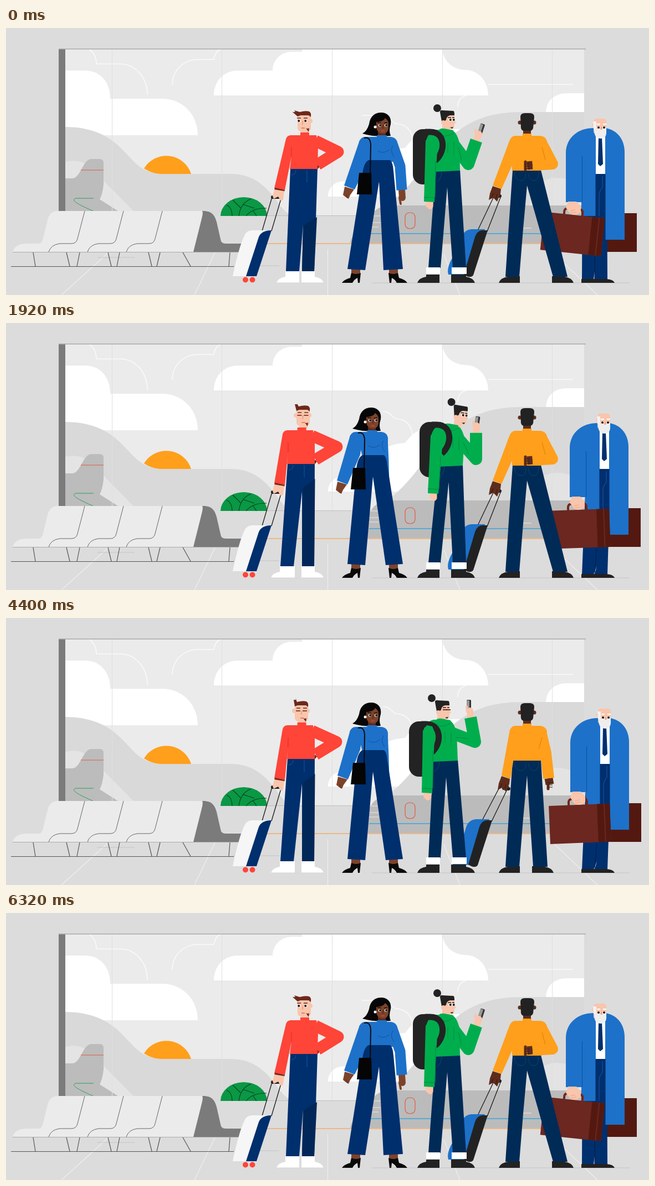
Animation of 1160x483 px, one loop 6.4 s. Source, as an HTML page with a canvas:

```html
<!DOCTYPE html>
<html lang="en">
<head>
<meta charset="utf-8">
<title>Waiting at the gate</title>
<style>
html, body { margin: 0; width: 100%; height: 100%; overflow: hidden; background: #dcdcdc; }
canvas { display: block; }
</style>
</head>
<body>
<canvas id="stage" width="1160" height="483"></canvas>
<script>
const c = document.getElementById('stage').getContext('2d');
const LOOP = 6400, STEP = 80;
const POSES = [0, 640, 1920, 3440, 4400, 5200, 6320];
const NAVY = '#002f6e', DEEP = '#002b57', BLUE = '#1d71c9', RED = '#ff4438', GREEN = '#00ad4d',
  ORANGE = '#ff9f1b', INK = '#222', SKIN = '#f9c5ac', BROWN = '#7d432a', DARK = '#5e2c1c',
  HAIR = '#6d281b', LEATHER = '#6b2720', MAROON = '#531910';
let t = 0;

// Eased value at the current time, one number per pose; the last returns to the first.
function key(...v) {
  v.push(v[0]);
  let i = 0;
  while (i < 5 && t >= POSES[i + 1]) i++;
  const u = Math.min(1, (t - POSES[i]) / (POSES[i + 1] - POSES[i]));
  return v[i] + (v[i + 1] - v[i]) * u * u * (3 - 2 * u);
}
const shut = (...times) => times.some(s => Math.abs(t - s) < 130);
const mix = (a, b, u) => a.map((n, i) => n + (b[i] - n) * u);

function fill(color, d) {
  c.fillStyle = color;
  c.fill(new Path2D(d));
}
function line(color, width, d, cap = 'butt') {
  c.strokeStyle = color;
  c.lineWidth = width;
  c.lineCap = cap;
  c.lineJoin = 'round';
  c.stroke(new Path2D(d));
}
const poly = (color, ...p) => fill(color, 'M' + p.join('L') + 'Z');
const limb = (color, width, p, cap) => line(color, width, 'M' + p.join('L'), cap);
function dot(color, x, y, r) {
  c.fillStyle = color;
  c.beginPath();
  c.arc(x, y, r, 0, 7);
  c.fill();
}
function box(color, x, y, w, h, r = 0) {
  c.fillStyle = color;
  c.beginPath();
  c.roundRect(x, y, w, h, r);
  c.fill();
}
function at(x, y, deg, draw) {
  c.save();
  c.translate(x, y);
  c.rotate(deg * Math.PI / 180);
  draw();
  c.restore();
}
function eyes(x, y, gap, closed, lid = '#3b1a12', look = 0) {
  for (const ex of [x - gap / 2, x + gap / 2]) {
    if (closed) limb(lid, 1.6, [[ex - 4, y], [ex + 4, y]]);
    else {
      dot('#fff', ex, y, 2.6);
      dot('#111', ex + look, y, 2);
    }
  }
}
function shoe(color, toe, heel, top) {
  const s = Math.sign(heel - toe);
  fill(color, `M${toe},461q${3 * s},-9 ${16 * s},-11V${top}H${heel}V461Z`);
}
function legs(color, [l, r, y], [a, b], crotch, [d, e], foot) {
  poly(color, [l, y], [a, foot], [b, foot], crotch, [d, foot], [e, foot], [r, y]);
}

function backdrop() {
  box('#dcdcdc', 0, 0, 1160, 483);
  box('#ebebeb', 107, 38, 936, 302);
  c.save();
  c.beginPath();
  c.rect(107, 38, 936, 302);
  c.clip();
  fill('#fff', 'M107,77H142C170,77 188,97 188,128H282C318,128 346,156 346,194H107Z');
  fill('#fff', 'M375,122C375,97 392,77 418,77H481C481,58 496,43 515,43H534V38H787C789,61 808,76 829,76C853,76 870,97 870,122Z');
  fill('#fff', 'M974,152C975,130 991,118 1012,118H1043V152Z');
  fill('#fff', 'M581,305C581,288 593,277 612,277H648C655,240 685,218 720,217C735,195 760,183 790,183H830L760,305Z');
  const trace = 'M150,38Q163,48 163,65H205C236,65 255,92 255,121M300,103C300,75 322,57 345,57H375Q377,42 388,38M870,102H1023' +
    'M815,143Q815,126 830,122M642,158H668M680,160C695,160 697,173 704,173C723,174 733,187 733,203';
  line('#fafafa', 1.6, trace);
  fill('#d9d9d9', 'M107,179C158,179 188,197 210,220L230,241Q252,264 282,264H405C447,264 468,286 488,312Q500,331 515,340H107Z');
  fill('#d9d9d9', 'M660,340Q705,315 745,262C795,200 830,152 930,152H1043V340Z');
  fill('#e3e3e3', 'M945,322C950,285 970,271 993,271Q1026,271 1043,296V340H945Z');
  fill(ORANGE, 'M249,254A47,47 0 0 1 334,264H278Q262,263 249,254Z');
  fill('#e4e4e4', 'M107,242Q139,235 158,258L230,331H107Z');
  fill('#bcbcbc', 'M107,272H120C134,272 139,237 154,237H169Q176,237 176,244V283Q174,301 169,310L202,331H107Z');
  line('#e25b42', 1, 'M135,257H176');
  line('#2ca05a', 1, 'M158,308H126C117,311 125,317 157,331');
  for (const x of [191, 389, 588, 787, 985]) line('#dfdfdf', 1, `M${x}.5,38V340`);
  c.restore();
  line('#bdbdbd', 1, 'M387,339.5H660');
  fill('#bbb', 'M621,389C624,368 647,363 657,342Q667,321 695,321H1043V389Z');
  line('#e8e8e8', 1, 'M655,340H681M655,352H676M650,360H672M910,362H948');
  line('#e25b42', 1.2, 'M720,343Q720,334 729,334T738,343V354Q738,363 729,363T720,354Z');
  line('#38a5d8', 1.3, 'M655,372H1000');
  line('#f0ad6e', 1.3, 'M440,390H985');
  box('#7b7b7b', 95, 38, 12, 293);
  line('#aaa', 1.5, 'M95,38H1046');

  line('#efefef', 1.2, 'M185,406L100,483M377,406L340,483M580.5,400V483M790,410L819,483M980,400L1067,483');
  line('#c4c4c4', 1, 'M660,461H1125M410,430H493M165,415H232');

  fill('#0a9845', 'M387,340A42,34 0 0 1 471,340Z');
  line('#063f20', 1.1, 'M420,340C422,325 428,315 442,309M398,320Q408,325 408,340M433,340Q445,325 470,326M423,325L409,311M427,319L448,326M446,331L452,340');

  fill('#ebebeb', 'M12,405Q16,390 38,390H60Q65,389 67,380L75,347Q79,331 94,331H362L342,405Z');
  fill('#7b7b7b', 'M338,405L353,345Q356,334 354,331C371,330 377,339 380,351L387,382Q388,390 396,390H430V405Z');
  for (const x of [0, 70, 140])
    line('#666', 1, `M${142 + x},331L${129 + x},381Q${127 + x},390 ${118 + x},390H${97 + x}Q${81 + x},392 ${77 + x},405`);
  line('#aaa', 1, 'M12,405.5H430');
  line('#555', 1.2, 'M9,431.5H411M49,406L53,431M109,406L115,431M133,406L128,431M184,406L190,431M205,406L200,431M257,406L263,431M278,406L272,431M319,406L333,431M404,406L402,431');
}

function elder() {
  const dx = key(0, 1, 7, 1, 8, 3), tilt = key(6, 5, -2, 5, -2.3, -.3);
  at(dx, 0, 0, () => box(MAROON, 1060, 335, 78, 70));
  legs(NAVY, [1040 + dx, 1084 + dx, 260], [1039, 1060], [1062 + dx / 2, 440], [1062, 1085], 455);
  line('#001f4c', 1, `M${1063 + dx},340L1062,455`);
  fill(INK, 'M1038,461V454H1075Q1095,453 1098,461Z');
  at(dx, 0, 0, () => {
    box('#fff', 1060, 190, 25, 74);
    fill(BLUE, 'M1010,315V225C1011,198 1032,181 1060,181L1064,195V340H1038V315Z');
    fill(BLUE, 'M1082,181C1104,185 1116,203 1116,225V383H1081V192Z');
    fill(NAVY, 'M1069,197H1075L1077,246L1072,250L1068,246Z');
    line('#0c4f98', 1, 'M1039.5,232V315M1063.5,264V340M1081.5,264V383');
    line('#1d57a0', 1, 'M1076,268V288Q1071,294 1070,300V340');
    box(SKIN, 1060, 164, 23, 28, 5);
    fill('#eee', 'M1061,181Q1072,185 1083,181V191Q1082,200 1073,200T1062,192Z');
    dot(SKIN, 1061, 175, 4);
    fill('#f2f2f2', 'M1059,169H1065V183H1060Z');
    line('#fff', 2, 'M1066,174H1072M1077,174H1083');
    eyes(1074, 180, 10, shut(640, 5200), '#fff');
    line('#e99d88', 2, 'M1074,179V184');
  });
  at(1023 + dx, 335, tilt, () => {
    line(HAIR, 4, 'M-16,5V-3Q-15,-8 -9,-8H11Q17,-8 17,-2V5');
    box(LEATHER, -52, 3, 110, 69);
    box(MAROON, 35, 3, 12, 69);
    box(MAROON, 49, 3, 9, 69);
  });
  at(dx, 0, 0, () => {
    fill(SKIN, 'M1014,314H1029L1037,323V333Q1028,341 1018,336L1010,325Z');
    line('#e9a58e', 1, 'M1018,331L1027,329M1019,335L1029,333');
  });
}

function backView() {
  const roll = key(0, 0, 0, 0, 1, 1);
  const dy = key(0, 3, 0, 0, 0, 0), step = key(0, 0, 0, -36, -36, -36);
  const hand = [881 + 16 * roll, 298 + 5 * roll + dy / 2];
  at(roll * 8, 0, 0, () => {
    line(INK, 1.4, `M851,366L${881 + roll * 3},303M868,368L${893 + roll * 6},304`);
    fill(BLUE, 'M798,446Q794,432 809,410Q817,397 821,382Q825,365 840,364H864L838,447Z');
    fill(INK, 'M826,446L846,378Q850,366 860,366H869L843,447Q838,454 826,446Z');
  });
  limb(INK, 6, [[hand[0] + 1, hand[1] + 5], [hand[0] + 10, hand[1] + 6]], 'round');

  shoe(INK, 889, 927, 449);
  shoe(INK, 1024 + step, 985 + step, 449);
  const knee = key(0, 1, 0, 0, 0, 0);
  poly(DEEP, [914, 257], [907 - knee * 9, 358], [901, 450], [926, 450], [933 - knee * 10, 363], [940, 285], [987 + step, 450], [1013 + step, 450], [965, 257]);
  line('#173f6b', 1, 'M917,261Q918,276 930,276Q938,276 938,263M943,263Q943,276 952,276Q961,276 961,261');

  at(0, dy, 0, () => {
    box(DARK, 933, 180, 14, 20);
    const hx = key(0, 0, 0, 0, 0, 7);
    at(hx, 0, 0, () => {
      dot(DARK, 927, 171, 3.5);
      dot(DARK, 953, 171, 3.5);
      fill(INK, 'M928,161Q928,154 936,154H945Q953,154 953,161L951,181Q950,186 944,186H935Q930,186 929,181Z');
    });
    fill(ORANGE, 'M919,195H963Q973,195 976,205L966,258H913L911,218L909,203Q912,195 919,195Z');
    box(ORANGE, 932, 191, 16, 8);
  });
  poly(ORANGE, [909, 202 + dy], [hand[0] - 3, 285], [hand[0] + 13, 291], [919, 235 + dy], [930, 205 + dy]);
  poly(DARK, [hand[0] - 3, 286], [hand[0] + 12, 291], [hand[0] + 11, 300], [hand[0] + 5, 314], [hand[0] - 2, 307], [hand[0] - 10, 311], [hand[0] - 8, 299]);
  line('#2e1510', 1, `M${hand[0] - 5},307l3,-8M${hand[0] + 3},309l2,-8`);

  const elbow = [key(986, 989, 986, 986, 974, 983), key(246, 247, 246, 246, 245, 248)];
  const wrist = [key(950, 957, 950, 950, 979, 979), key(248, 258, 248, 248, 290, 290)];
  const palm = [key(940, 946, 940, 940, 981, 979), key(249, 264, 249, 249, 301, 301)];
  limb(DARK, 15, [wrist, palm]);
  limb(DARK, 5, [[palm[0] - 3, palm[1] - 7], [palm[0] - 3, palm[1] + 8]], 'round');
  line('#351910', 1, `M${palm[0] - 4},${palm[1] - 3}h9m-9,4h9m-9,4h9`);
  limb(ORANGE, 20, [[965, 206 + dy], elbow, wrist]);
  line('#d97e0c', 1, `M967,${216 + dy}L${elbow[0] - 13},${elbow[1] - 8}`);
}

function hiker() {
  const top = key(0, 3, 9, -4, -5, -5), hip = key(0, 2, 5, -3, -4, -3);
  const px = key(0, 3, 12, -4, -7, -6), py = key(0, -2, -4, 2, 4, 2);
  at(px, py, 0, () => box('#232323', 734, 183, 52, 100, 18));
  shoe(INK, 742, 782, 446);
  shoe(INK, 846, 803, 446);
  legs(DEEP, [775 + hip, 819 + hip, 256], [762, 784], [796 + hip / 2, 288], [806, 830], 434);
  box('#fff', 758, 433, 25, 12);
  box('#fff', 804, 433, 27, 12);
  line('#174572', 1, `M${786 + hip},260Q${785 + hip},274 ${777 + hip},278`);

  const elbow = [key(834, 836, 848, 844, 846, 844), key(246, 249, 246, 228, 224, 229)];
  const hand = [key(852, 855, 848, 841, 836, 841), key(193, 194, 187, 173, 169, 173)];
  at(key(857, 862, 850, 843, 835, 841), key(184, 187, 180, 163, 159, 163), key(18, 20, 8, 18, 0, 8), () => {
    box('#333', -4, -11, 8, 23, 1.5);
    box('#999', -4, -10, 5, 21, 1);
  });
  limb(SKIN, 12, [mix(hand, elbow, .2), [hand[0] + 1, hand[1] - 1]], 'round');
  limb(SKIN, 4, [[hand[0] - 4, hand[1]], [hand[0] - 5, hand[1] - 9]], 'round');

  limb(GREEN, 22, [[804 + top, 206], elbow, mix(hand, elbow, .2)]);
  fill(GREEN, `M${757 + top},215Q${757 + top},189 ${776 + top},184H${802 + top}Q${813 + top},186 ${818 + top},208L${819 + hip},258L${775 + hip},260Z`);
  line('#038a3f', 1, `M${797 + top},206v20M${808 + top},206v24M${816 + top},216L${elbow[0] - 12},${elbow[1] - 6}`);

  at(key(0, 8, 21, -9, -9, -7), 0, 0, () => at(796, 182, key(0, 2, 7, -1, 0, 0), () => {
    dot(INK, key(-18, -18, -18, -17, -19, -19), -37, 7);
    box(SKIN, -6, -26, 19, 27, 5);
    box(SKIN, -9, -8, 14, 14);
    poly(SKIN, [12, -18], [16, -10], [12, -9]);
    fill(INK, 'M-13,-30Q-13,-34 -8,-33L11,-32Q13,-32 13,-24L5,-24Q-1,-23 -2,-16L-5,-13H-10Z');
    dot(SKIN, -7, -11, 4);
    line(INK, 1.5, 'M1,-20H7M9,-20H13');
    eyes(8, -16, 6, shut(640, 4400), '#3b1a12', .7);
    poly(INK, [5, -2], [11, -3], [9, 0]);
  }));
  at(top, 0, 0, () => {
    fill(GREEN, 'M780,186Q782,181 791,182L807,185Q808,193 799,197Q785,200 779,192Z');
    line('#038a3f', 1, 'M779,191Q791,201 807,190');
  });

  at(px, py, 0, () => line('#232323', 11, 'M756,188H765C793,188 794,224 774,240'));
  const wx = key(764, 764, 771, 762, 760, 761), wy = key(314, 312, 308, 314, 316, 315);
  limb(SKIN, 13, [[wx, wy - 4], [wx, wy + 10]]);
  dot(SKIN, wx + 1, wy + 9, 5);
  poly(GREEN, [757 + top, 204], [wx - 10, wy], [wx + 9, wy + 1], [777 + top, 238], [779 + top, 208], [774 + top, 196], [764 + top, 194]);
  line('#038a3f', 1, `M${wx - 10},${wy - 8}l19,1M${775 + top},240L${wx + 10},${wy - 8}`);
}

function lady() {
  const top = key(0, -4, -17, 4, -17, -18), hip = key(0, -3, -11, 5, -11, -13), head = key(0, -10, -18, 1, -18, -20);
  const hx = key(617, 611, 604, 623, 605, 604);
  const elbow = [key(711, 702, 681, 734, 681, 680), key(250, 250, 250, 222, 250, 250)];
  const wrist = [key(714, 706, 682, 710, 682, 681), key(293, 291, 292, 252, 292, 292)];
  const palm = [key(715, 706, 679, 705, 679, 678), key(307, 304, 292, 262, 292, 292)];
  limb(BROWN, 12, [wrist, palm], 'round');
  limb(BROWN, 4, [[palm[0] - 5, palm[1]], [palm[0] - 3, palm[1] + 11]], 'round');
  limb(BLUE, 19, [[696 + top, 207], elbow, wrist]);

  for (const [x, s] of [[606, 1], [724, -1]]) at(x, 0, 0, () => {
    c.scale(s, 1);
    box(BROWN, 17, 434, 16, 12);
    fill('#0a0a0a', 'M0,461Q4,455 15,452L17,443Q25,447 34,443L32,461H29L28,452Q22,455 19,461Z');
  });
  poly(BLUE, [638 + top, 203], [hx - 7, 285], [hx + 12, 292], [656 + top, 238], [660 + top, 208]);
  fill(BLUE, `M${648 + top},197H${694 + top}Q${707 + top},198 ${706 + top},213L${699 + hip},242H${654 + hip}L${656 + top},225L${637 + top},206Q${640 + top},197 ${648 + top},197Z`);
  line('#1253a0', 1, `M${671 + top},222Q${680 + top},229 ${692 + top},220M${698 + top},213Q${692 + top},222 ${700 + top},233`);
  fill(BROWN, `M${hx - 6},287L${hx + 11},292L${hx + 4},302L${hx + 1},309L${hx - 4},306L${hx - 9},302Z`);
  line('#532817', 1, `M${hx - 3},301l2,7`);

  const right = key(681, 681, 685, 681, 685, 685);
  fill(NAVY, `M${654 + hip},239H${693 + hip}Q${698 + hip},243 ${699 + hip},258L716,436L${right},438L${673 + hip},278L648,438L616,436L${643 + hip},265Q${645 + hip},244 ${654 + hip},239Z`);
  at(key(0, -4, -11, 7, -11, -13), 0, 0, () => {
    line('#0a0a0a', 2, 'M646,199Q657,196 658,211L657,264');
    poly('#050505', [637, 262], [659, 262], [660, 301], [633, 301]);
  });

  at(head, 0, 0, () => {
    fill('#070707', 'M643,191Q651,187 655,174C657,158 667,152 679,153C690,154 696,163 694,174Q690,186 694,195Q666,198 643,191Z');
    box(DARK, 671, 184, 14, 15);
    fill(BROWN, 'M668,170Q680,170 684,163Q690,167 690,173V182Q688,191 680,191Q669,190 668,180Z');
    line('#21100a', 1.5, 'M670,171L677,172M682,172L688,171');
    eyes(680, 176, 11, shut(640, 3440), '#21100a', .5);
    line(DARK, 2, 'M680,176V182');
    line('#b2473e', 2, 'M677,186H683');
    dot('#fff', 666, 179, 2.5);
  });
  fill(BLUE, `M${669 + top / 2 + head / 2},194h18v8h-18Z`);
}

function fellow() {
  const dx = key(0, 0, -6, -8, -6, 0), hip = key(0, 0, -5, -6, -5, 0), foot = key(0, -7, -10, -10, -10, -10);
  line(INK, 1.4, 'M462,367L480,306M479,367L497,306');
  fill('#f6f6f6', 'M409,449C415,420 424,386 431,374Q435,366 444,366H478L450,449Z');
  fill(NAVY, 'M433,449L456,378Q461,366 479,366L452,449Z');
  dot(RED, 432, 455.5, 5);
  dot(RED, 444.5, 455.5, 5);

  shoe('#fff', 488 + foot, 529 + foot * .8, 440);
  shoe('#fff', 573, 533, 440);
  line('#d6d6d6', 1, `M${488 + foot},461H530M533,461H573`);
  legs(NAVY, [513 + hip, 562 + hip, 254], [505 + foot, 529 + foot], [536 + foot * .2, key(356, 315, 305, 300, 300, 310)], [534, 556], 440);
  const shade = key(350, 315, 290, 290, 290, 320);
  poly('#002758', [536, shade + 8], [534, 440], [556, 440], [561 + hip * .7, shade - 8]);
  line('#1c539a', 1, `M${543 + hip},257v22M${523 + hip},257q0,8 -8,9`);

  limb(HAIR, 8, [[563 + hip, 248], [558 + hip, 254]]);
  limb(RED, 21, [[558 + dx, 204], [key(599, 599, 597, 595, 596, 599), 224], [562 + dx * .6, 247]]);
  fill(RED, `M${514 + dx},194H${560 + dx}L${563 + dx},214L${562 + hip},255H${512 + hip}L${515 + dx},232L503,293L484,290L${505 + dx},201Q${507 + dx},194 ${514 + dx},194Z`);
  line('#d92f29', 1, `M${515 + dx},216v18`);
  limb(INK, 6, [[481, 306], [497, 306]], 'round');
  fill(HAIR, 'M485,289L503,293L502,296L484,293Z');
  fill(SKIN, 'M484,292L502,295L500,310Q497,315 494,310L491,305L483,309L481,304Z');

  const look = key(-1, -.7, -.2, 1, 0, -1);
  at(key(538, 538, 536, 535, 533, 540), key(0, 0, -1, 0, 0, -1), 0, () => {
    box(SKIN, -7, 178, 15, 14);
    if (look < .3) dot(SKIN, 11, 168, 4);
    if (look > -.3) dot(SKIN, -13, 168, 4);
    box(SKIN, -12, 155, 24, 32, 6);
    at(0, 0, 0, () => {
      if (look > .5) c.scale(-1, 1);
      const lift = key(0, -2, -4, 0, -4, -2), tuft = key(-21, -18, -15, -16, -14, -18);
      fill(HAIR, `M-12,160L${tuft},${152 + lift}L${tuft + 5},${152 + lift}L${tuft + 3},${149 + lift}L-8,152Q2,149 9,151Q13,153 12,161L8,158H-7Z`);
    });
    fill(HAIR, 'M3,181Q6,183 9,181L8,188Z');
    line(HAIR, 1.7, `M${look * 4 - 9},163h7m5,0h7`);
    eyes(look * 3, 168, 12, shut(640, 1920, 4400), HAIR, look * .7);
    line('#efa28b', 2, `M${look * 3},168v7`);
    line('#c4594d', 1.2, `M${look * 3 - 2},181h6`);
  });
  box(RED, 531 + dx * .9, 189, 16, 9, 1);
}

function frame() {
  t = Math.floor(performance.now() % LOOP / STEP) * STEP;
  backdrop();
  elder();
  backView();
  hiker();
  lady();
  fellow();
  requestAnimationFrame(frame);
}
frame();
</script>
</body>
</html>
```
